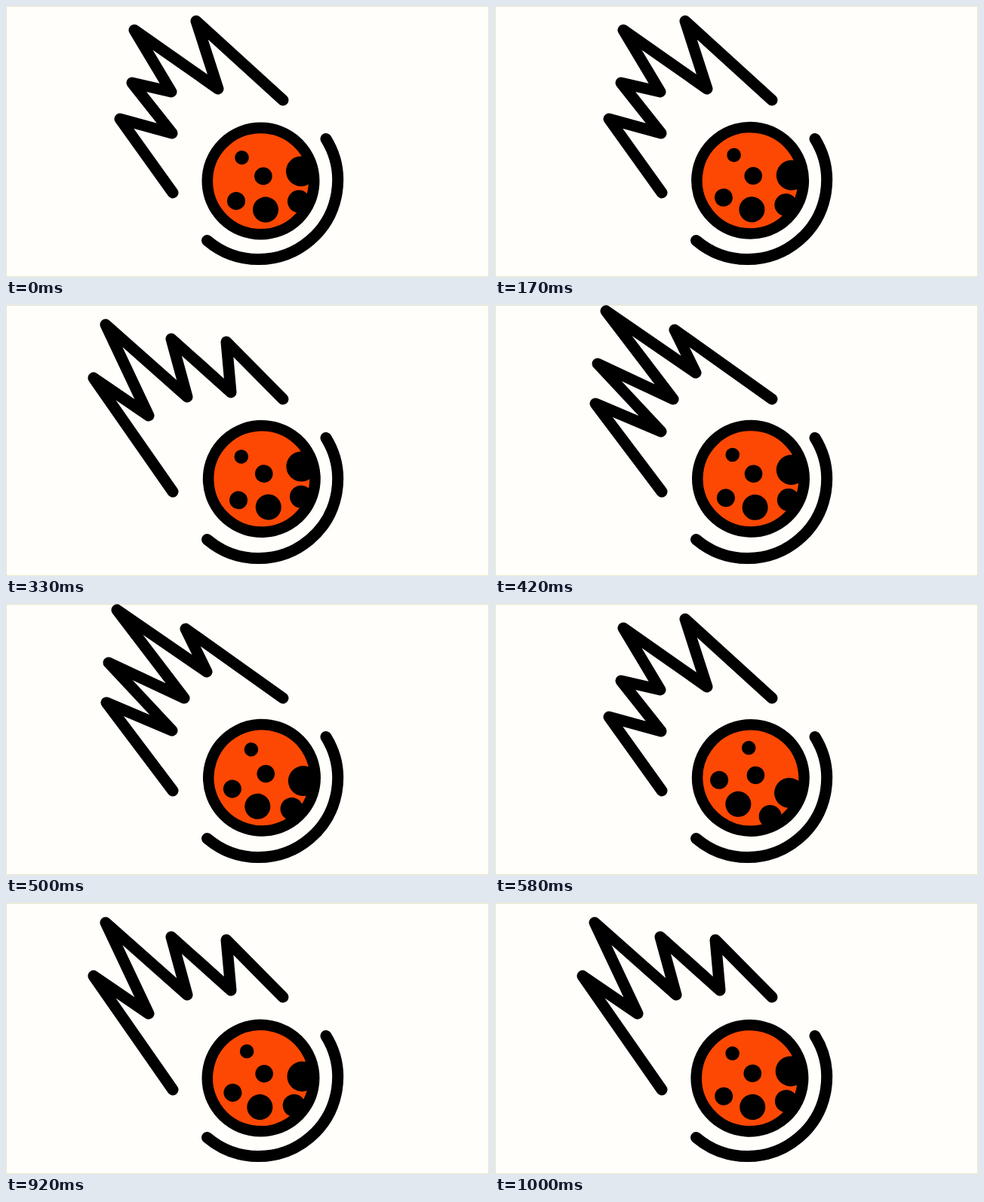
An HTML page that plays this animation: 640 by 360 pixels, repeating every 1.08 s.

```html
<!DOCTYPE html>
<html lang="en">
<head>
<meta charset="utf-8">
<title>Comet</title>
<style>
  html, body { margin: 0; height: 100%; overflow: hidden; background: #fffefa; }
  svg { display: block; width: 100vw; height: 100vh; }
  .line { fill: none; stroke: #000; stroke-width: 15; stroke-linecap: round; stroke-linejoin: round; }
</style>
</head>
<body>
<svg viewBox="0 0 640 360">
  <rect x=".5" y=".5" width="639" height="359" fill="none" stroke="#e8e8c8"/>
  <polyline id="tail" class="line"/>
  <path class="line" d="M424 176.5A105 105 0 0 1 266.5 311.5"/>
  <g id="rock">
    <circle r="70.7" fill="#fd4803" stroke="#000" stroke-width="14.6"/>
    <circle cx="-25" cy="-31.2" r="9.3"/>
    <circle cx="3.4" cy="-6.6" r="11.8"/>
    <circle cx="-32.5" cy="26.3" r="12"/>
    <circle cx="6.5" cy="38" r="17"/>
    <circle cx="53.5" cy="-13" r="20"/>
    <circle cx="50.5" cy="27" r="15"/>
  </g>
</svg>
<script>
const LOOP = 1080, STEPS = 13, STEP_MS = 83.334;
const tail = document.getElementById('tail');
const rock = document.getElementById('rock');

// Inner corners of the tail; both ends stay fixed.
const tails = {
  A: '151,150 220,169 167,102 219,114 170,32 281,110 252,20',
  B: '116,97 189,147 132,26 240,122 219,45 298,116 292,49',
  C: '133,131 220,168 136,78 236,125 147,8 266,90 238,33',
  D: '122,122 196,145 134,58 246,136 197,48 276,98 276,48'
};
const order = 'AAABBCCAADDBB';

// Rock tilt in degrees as [step, angle] keys, joined smoothly.
const keys = [[0, 0], [2, 6.3], [4, -3.7], [5, 1.3], [7, 35], [9, 32.6], [12, 4], [13, 0]];

function tilt(step) {
  const n = keys.findIndex(key => key[0] > step);
  const [t0, a0] = keys[n - 1], [t1, a1] = keys[n];
  const u = (step - t0) / (t1 - t0);
  return a0 + (a1 - a0) * u * u * (3 - 2 * u);
}

function draw(now) {
  const step = Math.min(STEPS - 1, Math.floor((now % LOOP + 3.5) / STEP_MS));
  const drift = Math.cos((step + 1) / STEPS * 2 * Math.PI);
  tail.setAttribute('points', `221,248 ${tails[order[step]]} 367,125`);
  rock.setAttribute('transform',
    `translate(${338.2 - 0.8 * drift} ${231.7 + drift}) rotate(${tilt(step)})`);
}

let start;
function tick(now) {
  start ??= now;
  draw(now - start);
  requestAnimationFrame(tick);
}
draw(0);
requestAnimationFrame(tick);
</script>
</body>
</html>
```
